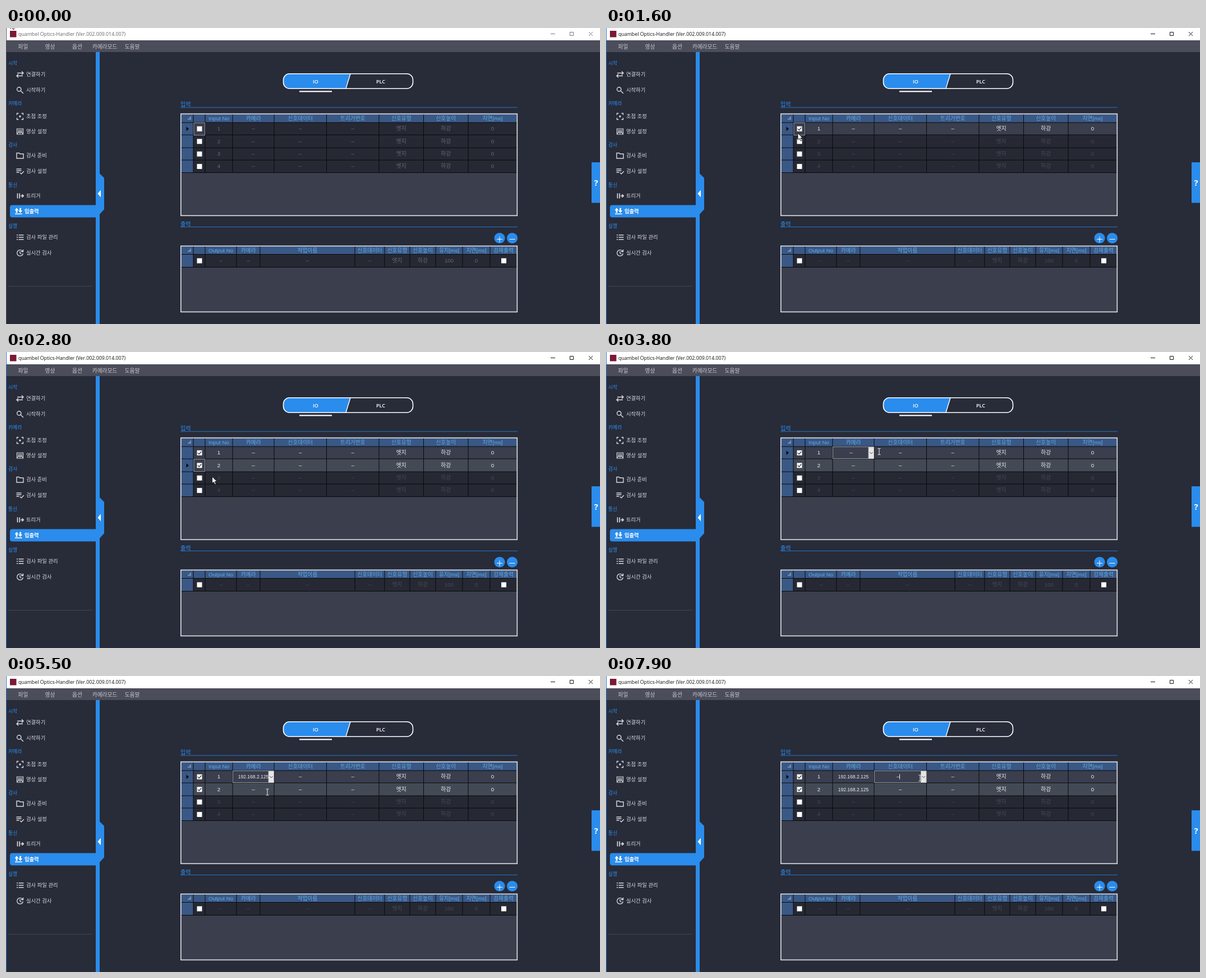
An HTML page that plays this animation: 1059 by 529 pixels, repeating every 8 s.

```html
<!DOCTYPE html>
<html lang="ko">
<head>
<meta charset="utf-8">
<title>Optics-Handler</title>
<style>
  html, body { margin: 0; width: 100%; height: 100%; overflow: hidden; background: #282b38; }
  svg {
    display: block; width: 100vw; height: 100vh;
    --dim: #666971; --chrome: #777; --title: #666; --edge: #55565e;
    font: 9.7px "Liberation Sans", "Noto Sans CJK KR", "Noto Sans CJK", sans-serif;
  }
  svg.active { --dim: #484b55; --chrome: #111; --title: #111; --edge: #1d7ad6; }
  .mid { text-anchor: middle; }
  .title { font: 8.8px "Open Sans", "Noto Sans", sans-serif; fill: var(--title); }
  .chrome { fill: none; stroke: var(--chrome); }
  .menu { fill: #c9c9ce; }
  .group { font-size: 8.8px; fill: #2b90f0; }
  .item { font-size: 9.3px; fill: #d9dbe0; }
  .picked { font-size: 9.3px; font-weight: 700; fill: #fff; }
  .head { fill: #62abe6; }
  .section { font-size: 10.2px; fill: #2b90f0; }
  .dim { fill: var(--dim); }
  .lit { fill: #f0f0f2; }
  .ip { font-size: 8.5px; }
  .tab { font: 600 9px "Open Sans", "Noto Sans", sans-serif; fill: #fff; }
  .help { font: 700 15px "Open Sans", "Noto Sans", sans-serif; fill: #fff; }
  .icon { fill: none; stroke: #d9dbe0; stroke-width: 1.4; }
</style>
</head>
<body>
<svg id="stage" viewBox="0 0 1059 529" preserveAspectRatio="none" xmlns="http://www.w3.org/2000/svg">
  <g id="base"></g>
  <g id="grid"></g>
  <g id="pointer"></g>
</svg>
<script>
const LOOP = 8000, STEP = 100;
const BLUE = '#2a8cec', PANEL = '#3a3e4d', DARK = '#262933', STEEL = '#3a5885';
const IP = '192.168.2.125', NONE = '–';
const $ = id => document.getElementById(id);

const rect = (x, y, w, h, fill, more = '') =>
  `<rect x="${x}" y="${y}" width="${w}" height="${h}" fill="${fill}" ${more}/>`;
const path = (d, more) => `<path d="${d}" ${more}/>`;
const text = (x, y, s, cls) => `<text x="${x}" y="${y + 3.4}" class="${cls}">${s}</text>`;
const mid = (x, y, s, cls) => text(x, y, s, 'mid ' + cls);
const center = (edges, i) => (edges[i] + edges[i + 1]) / 2;

// ---- Window frame, menu and sidebar ----
const MENU = [[30.5, '파일'], [78.5, '영상'], [127, '옵션'], [176, '카메라모드'], [225, '도움말']];
const GROUPS = [[63, '시작'], [135, '카메라'], [209, '검사'], [281, '통신'], [354, '실행']];
const ITEMS = [
  [83, '연결하기', 'M-5 -2.5H6M3 -5.5L6 -2.5L3 .5M5 2.5H-6M-3 -.5L-6 2.5L-3 5.5'],
  [111, '시작하기', 'M2 -1.5A3.7 3.7 0 1 1 -5.4 -1.5A3.7 3.7 0 1 1 2 -1.5M1 1.2L6 6'],
  [158, '초점 조정', 'M-5.5 -2.5V-5.5H-2.5M2.5 -5.5H5.5V-2.5M5.5 2.5V5.5H2.5M-2.5 5.5H-5.5V2.5M-1 0A1 1 0 1 1 1 0A1 1 0 1 1 -1 0'],
  [185, '영상 설정', 'M-5.5 -5H5.5V5H-5.5ZM-4 -2.5H4M-4 -.2H4M-5 3.5L-2 1L0 3L2 1L5 3.5', '1.2'],
  [228, '검사 준비', 'M-6 -4.5H-1.5L0 -3H6V5H-6Z'],
  [256, '검사 설정', 'M-6.5 -4H2.5M-6.5 -1H2.5M-6.5 2H-1.5M0 2.5L2.3 4.8L7 0'],
  [300, '트리거', 'M-4.5 -4.5V4.5M-.8 -4.5V4.5M1 0H6M3.5 -2.7L6.2 0L3.5 2.7', '1.7'],
  [374, '검사 파일 관리', 'M-6 -4H-4M-6 0H-4M-6 4H-4M-2.5 -4H6.5M-2.5 0H6.5M-2.5 4H6.5'],
  [402, '실시간 검사', 'M4.6 -3A5.4 5.4 0 1 0 5.4 1M5.5 -6V-2.3H1.8M0 -3V.5L2.5 2']
];

function sidebar() {
  let s = rect(160, 43, 7, 486, BLUE)
    + path('M167 260L175 268V324L167 333Z', `fill="${BLUE}"`)
    + path('M163.5 296L169 289.5V302.5Z', 'fill="#fff"')
    + rect(7, 316.5, 156, 22, BLUE, 'rx="4"')
    + path('M19 321.5l3.6 4.3h-2.2v4.4h-2.8v-4.4h-2.2ZM25.6 330.5l3.6 -4.3h-2.2v-4.4h-2.8v4.4h-2.2ZM16 331.5H28.6V333H16Z',
      'fill="#fff"')
    + text(33, 327.5, '입출력', 'picked')
    + rect(4, 461, 149, 1, '#444753');
  for (const [y, name] of GROUPS) s += text(4, y, name, 'group');
  for (const [y, name, d, w = '1.4'] of ITEMS) {
    s += path(d, `class="icon" transform="translate(25 ${y})" style="stroke-width:${w}"`)
      + text(36, y, name, 'item');
  }
  return s;
}

function frame() {
  let s = rect(0, 0, 1059, 529, '#282b38') + rect(0, 0, 1059, 22, '#fff')
    + rect(7, 5, 11.5, 11.5, '#7c1834')
    + text(22, 10.7, 'quambel Optics-Handler (Ver.002.009.014.007)', 'title')
    + path('M971 10.5H979M1005.5 7.5H1011.5V13.5H1005.5ZM1039 7L1046 14M1046 7L1039 14', 'class="chrome"')
    + rect(0, 22, 1059, 21, '#4c4d5b');
  for (const [x, name] of MENU) s += mid(x, 33.5, name, 'menu');
  return s + sidebar() + rect(0, 0, 1, 529, 'var(--edge)')
    + rect(1044, 240, 15, 72.5, BLUE)
    + `<text x="1052" y="281.5" class="mid help">?</text>`;
}

function tabs() {
  return path('M614 82H505Q494.5 83 494.5 95T505 108H606Z', `fill="${BLUE}"`)
    + rect(494.5, 81.8, 231, 26.4, 'none', 'rx="11" stroke="#fff" stroke-width="1.6"')
    + path('M614 82L606 108', 'stroke="#fff" stroke-width="1.4"')
    + mid(552, 95.6, 'IO', 'tab') + mid(668, 95.6, 'PLC', 'tab')
    + rect(523, 112.3, 58, 2.2, '#fff');
}

// ---- Tables ----
const IN_X = [312, 334, 355, 404, 478, 571.5, 665, 744.5, 824, 911];
const IN_Y = [169, 191, 214, 236, 258.5];
const IN_HEAD = ['Input No', '카메라', '신호데이터', '트리거번호', '신호유형', '신호높이', '지연[ms]'];
const OUT_X = [312, 334, 355, 411, 453, 622, 675, 720, 766, 814, 863, 911];
const OUT_Y = [404.5, 427.5];
const OUT_HEAD = ['Output No', '카메라', '작업이름', '신호데이터', '신호유형', '신호높이', '유지[ms]', '지연[ms]', '강제출력'];
const OUT_ROW = [NONE, NONE, NONE, NONE, '엣지', '하강', '100', '0'];

const section = (y, name) => text(311, y + .5, name, 'section') + rect(311, y + 5, 601, 1, '#2476c8');
const box = (x, y) => rect(x - 4.5, y - 4.5, 9, 9, '#fff');
const tick = (x, y) => path(`M${x - 3} ${y}l2.2 2.4l4 -4.8`, 'fill="none" stroke="#222" stroke-width="1.2"');

function header(xs, y, h, names) {
  const end = xs[xs.length - 1];
  let s = rect(312, y, end - 312, h, STEEL);
  for (const [dx, dy] of [[4, 0], [4, 2], [4, 4], [2, 2], [2, 4], [0, 4]])
    s += rect(324.5 + dx, y + 4.5 + dy, 1.2, 1.2, '#cfe0f2');
  names.forEach((n, i) => s += mid(center(xs, i + 2), y + h / 2, n, 'head'));
  return s;
}

const lines = (xs, ys, top) => path(
  xs.slice(1, -1).map(x => `M${x} ${top}V${ys[ys.length - 1]}`).join('')
  + ys.map(y => `M312 ${y}H911`).join(''), 'stroke="#08090c" fill="none"');

const border = (y, h) =>
  rect(311.8, y, 599.5, h, 'none', 'stroke="#d9dbdf" stroke-width="1.7"');

function outputTable() {
  let s = rect(311, 389, 601, 119, PANEL) + header(OUT_X, 390, 14.5, OUT_HEAD)
    + rect(312, 404.5, 22, 23, STEEL) + rect(334, 404.5, 577, 23, DARK)
    + lines(OUT_X, OUT_Y, 390) + box(345, 416) + box(887.5, 416);
  OUT_ROW.forEach((v, i) => s += mid(center(OUT_X, i + 2), 415.5, v, 'dim'));
  for (const x of [880, 902.5]) s += `<circle cx="${x}" cy="375.5" r="9.6" fill="${BLUE}"/>`;
  return s + border(389.6, 117.8)
    + path('M875 377.5H885M880 372.5V382.5M897.5 377.5H907.5', 'stroke="#fff"');
}

// ---- Changing state ----
function stateAt(t) {
  const second = t >= 6100 && t < 7700;
  return {
    active: t >= 1400,
    enabled: [t >= 1400 ? 7 : 0, t < 2100 ? 0 : t < 2200 ? 5 : 7, 0, 0],
    tint: t < 2300 ? '#494b54' : '#434a55',
    row: second || (t >= 2100 && t < 3600) ? 1 : 0,
    edit: t < 3600 ? 0 : t < 7700 ? 1 : 2,
    camera: [t >= 5200 ? IP : NONE, t >= 7200 ? IP : NONE, NONE, NONE],
    open: (t >= 4400 && t < 5200) || (t >= 6300 && t < 7200),
    hover: (t >= 4100 && t < 5200) || (t >= 5900 && t < 7200),
    choice: (t >= 4700 && t < 5200) || t >= 6600 ? 1 : 0
  };
}

function editor(st) {
  const c = st.edit + 2, x = IN_X[c], r = IN_X[c + 1], y = IN_Y[st.row], h = IN_Y[st.row + 1] - y;
  const value = st.edit === 1 ? st.camera[st.row] : NONE;
  const my = y + h / 2;
  const typed = value === IP
    ? mid(center(IN_X, c), my - .5, value, 'lit ip')
    : mid(center(IN_X, c) - 4, my - .5, value, 'lit');
  let s = rect(x + .5, y + .5, r - x - 1, h - 1, PANEL, 'stroke="#92949a"') + typed
    + rect(r - 10, y + 1, 9.5, h - 1.5, st.hover ? '#cbe5fa' : '#e6e6e6',
      `stroke="${st.hover ? '#4a9fe6' : '#b4b4b4'}" stroke-width=".8"`)
    + path(`M${r - 8} ${my - 1}l2.8 2.8l2.8 -2.8`, 'fill="none" stroke="#444"');
  if (st.edit === 2) s += rect(523, my - 4.5, 1, 9, '#f0f0f2');
  return s;
}

function dropList(st) {
  const y = IN_Y[st.row + 1] + .5, h = 9.5;
  return rect(404, y, 73.5, 2 * h, '#fff') + rect(404, y + st.choice * h, 73.5, h, '#0a78d7')
    + [NONE, IP].map((v, i) =>
      `<text x="406.5" y="${y + 7.3 + i * h}" class="ip" fill="${i === st.choice ? '#fff' : '#111'}">${v}</text>`).join('');
}

function inputTable(st) {
  let s = rect(311, 152.5, 601, 183.5, PANEL) + header(IN_X, 154, 15, IN_HEAD)
    + rect(312, 169, 22, 89.5, STEEL) + rect(334, 169, 577, 89.5, DARK);
  for (let r = 0; r < 4; r++) {
    const y = IN_Y[r], h = IN_Y[r + 1] - y, n = st.enabled[r];
    if (n) s += rect(334, y, IN_X[n + 2] - 334, h, r ? st.tint : PANEL);
  }
  s += lines(IN_X, IN_Y, 154);
  for (let r = 0; r < 4; r++) {
    const y = center(IN_Y, r);
    const row = [r + 1, st.camera[r], NONE, NONE, '엣지', '하강', '0'];
    if (r === st.row) {
      s += path(`M321.5 ${y - 3.5}l4.5 3.8l-4.5 3.8Z`, 'fill="#0a0a0d"');
      if (!st.edit) s += rect(335, IN_Y[r] + .5, 19.5, 22, PANEL, 'stroke="#8f9198"');
    }
    s += box(345, y + .2);
    if (st.enabled[r]) s += tick(345, y + .2);
    row.forEach((v, i) => {
      if (st.edit && r === st.row && i === st.edit) return;
      s += mid(center(IN_X, i + 2), y - .4, v, (i < st.enabled[r] ? 'lit' : 'dim') + (v === IP ? ' ip' : ''));
    });
  }
  if (st.edit) s += editor(st);
  s += border(153.5, 181.8);
  return st.open ? s + dropList(st) : s;
}

// ---- Pointer: time, x, y ----
const ROUTE = [
  [0, 8, -11], [300, 8, -11], [1100, 342, 185.5], [1500, 342, 185.5], [1900, 342, 201],
  [2000, 342, 201], [2100, 343, 209.5], [2300, 349, 232], [2500, 350, 232], [2600, 350, 232],
  [3400, 462, 173], [3500, 462, 173], [3800, 487, 178], [4100, 473, 178], [4500, 473, 178],
  [4900, 473, 203], [5100, 473, 203], [5500, 466, 207.5], [5700, 470, 208], [6300, 470, 208],
  [6800, 470, 225], [7100, 470, 225], [7900, 560, 182.5], [8000, 560, 182.5]
];
const BEAM = [[3600, 4100], [5200, 5900], [7200, 8000]];
const ARROW = 'M0 0V12L2.8 9.4L4.7 13.8L6.8 12.9L4.9 8.7H8.7Z';

function pointer(t) {
  const i = ROUTE.findIndex((p, k) => k && t <= p[0]);
  const [t0, x0, y0] = ROUTE[i - 1], [t1, x1, y1] = ROUTE[i];
  const u = (t - t0) / (t1 - t0), e = u * u * (3 - 2 * u);
  const at = `transform="translate(${x0 + (x1 - x0) * e} ${y0 + (y1 - y0) * e})"`;
  return BEAM.some(([a, b]) => t >= a && t < b)
    ? path('M-2.5 -5.5H-.8L0 -5L.8 -5.5H2.5M0 -5V5M-2.5 5.5H-.8L0 5L.8 5.5H2.5', `${at} fill="none" stroke="#f2f2f2"`)
    : path(ARROW, `${at} fill="#fff" stroke="#111" stroke-width=".9"`);
}

$('base').innerHTML = frame() + tabs() + section(136.5, '입력') + section(350, '출력') + outputTable();

const start = performance.now();
let shown = -1;
function draw() {
  const t = Math.floor((performance.now() - start) % LOOP / STEP) * STEP;
  if (t !== shown) {
    const st = stateAt(t);
    $('stage').classList.toggle('active', st.active);
    $('grid').innerHTML = inputTable(st);
    $('pointer').innerHTML = pointer(t);
    shown = t;
  }
  requestAnimationFrame(draw);
}
draw();
</script>
</body>
</html>
```
